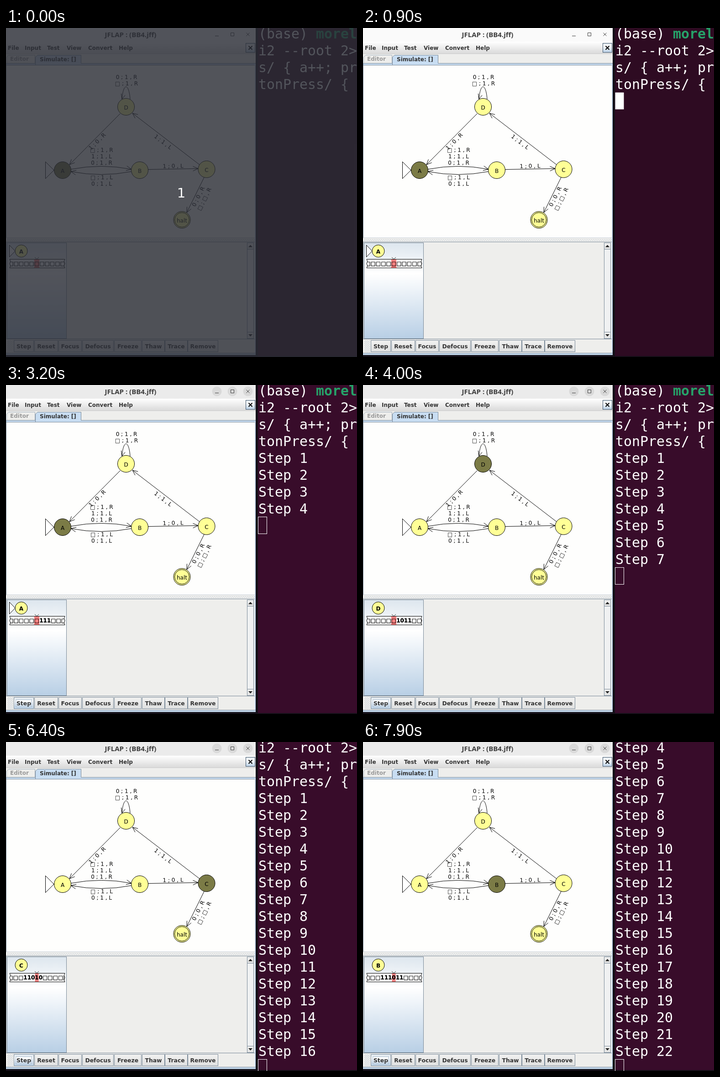
Recreate the animation shown at these times as an HTML page. Size 769x722 px, loop 8 s.

```html
<!DOCTYPE html>
<html lang="en">
<head>
<meta charset="utf-8">
<title>Turing machine stepper</title>
<style>
  html, body { margin: 0; width: 100%; height: 100%; overflow: hidden; background: #141018; }
  svg { display: block; }
  text { font: 12px "DejaVu Sans", sans-serif; fill: #000; white-space: pre; }
  .bold { font-weight: 700; fill: #333; }
  .mid { text-anchor: middle; }
  .title { font: 700 15px "Open Sans", sans-serif; fill: #3d3d3d; }
  .term { font: 29.9px "DejaVu Sans Mono", monospace; fill: #fff; }
  .tape { font-weight: 700; stroke: #000; stroke-width: .3; }
</style>
</head>
<body>
<svg id="stage" width="769" height="722" viewBox="0 0 769 722">
  <defs>
    <linearGradient id="ocean" x2="0" y2="1">
      <stop offset="0" stop-color="#dde6ee"/><stop offset=".32" stop-color="#fff"/><stop offset="1" stop-color="#b8cfe5"/>
    </linearGradient>
    <linearGradient id="menu" x2="0" y2="1"><stop offset="0" stop-color="#fff"/><stop offset="1" stop-color="#dadada"/></linearGradient>
    <linearGradient id="button" x2="0" y2="1"><stop offset="0" stop-color="#f2f2f1"/><stop offset="1" stop-color="#dfe0e0"/></linearGradient>
    <pattern id="bumps" width="4" height="4" patternUnits="userSpaceOnUse">
      <path d="M0 0h1v1h-1zM2 2h1v1h-1z" fill="#8a9aab"/><path d="M1 1h1v1h-1zM3 3h1v1h-1z" fill="#fff"/>
    </pattern>
    <clipPath id="tapeClip"><path d="M9 505H128V528H9z"/></clipPath>
  </defs>
</svg>
<script>
const stage = document.getElementById("stage");
const LOOP = 8000, ROW = 37, STATE = "#ffff96", ACTIVE = "#7b7b46", EDGE = "#7a8a99", BLUE = "#c8ddf2";

function add(tag, attrs, parent = stage) {
  const node = document.createElementNS("http://www.w3.org/2000/svg", tag);
  for (const key in attrs) node.setAttribute(key, attrs[key]);
  return parent.appendChild(node);
}
const box = (x, y, width, height, fill, stroke = "none", parent) =>
  add("rect", { x, y, width, height, fill, stroke }, parent);
const path = (d, attrs) => add("path", { d, fill: "none", stroke: "#000", ...attrs });
const circle = (cx, cy, r, fill, stroke = "#000", parent) => add("circle", { cx, cy, r, fill, stroke }, parent);
function label(text, x, y, cls = "", parent, attrs = {}) {
  const node = add("text", { x, y, class: cls, ...attrs }, parent);
  node.textContent = text;
  return node;
}
const show = (node, on) => node.setAttribute("visibility", on ? "visible" : "hidden");

// Terminal
const terminal = box(552, 0, 217, 720, "#2e0b22");
const screen = add("g", {});
const lines = ["(base) ", "i2 --root 2>", "s/ { a++; pr", "tonPress/ {"];
for (let i = 1; i <= 22; i++) lines.push("Step " + i);
const rows = lines.map((text, i) => label(text, 553, 23 + ROW * i, "term", screen));
label("morel", 679, 23, "term", screen, { style: "fill:#26a269;font-weight:700" });
const cursor = box(552.5, 0, 19, 37, "#fff", "none", screen);

// Window frame
box(0, 0, 547, 718, "#eeeeec");
const titleBar = box(0, 0, 547, 30, "#fafafa");
const titleButtons = add("g", {});
for (const x of [462, 496, 530]) circle(x, 14, 10.5, "#d9d9d9", "none", titleButtons);
path("M458 17.5H466M492.5 10.5h7v7h-7zM526.5 10.5l7 7M533.5 10.5l-7 7", { stroke: "#3d3d3d" });
label("JFLAP : (BB4.jff)", 273, 20, "title mid");

box(0, 30, 547, 26, "url(#menu)");
path("M0 56.5H547", { stroke: "#ccc" });
[["File", 4], ["Input", 41], ["Test", 90], ["View", 133], ["Convert", 180], ["Help", 247]]
  .forEach(([text, x]) => label(text, x, 48, "bold"));
box(525.5, 33.5, 20, 20, "url(#ocean)", "#41566b");
path("M531.5 39.5l8 8M539.5 39.5l-8 8", { "stroke-width": 2 });

// Tabs
path("M1.5 77V64L6 59.5H63.5V77", { stroke: "#a3b0bd" });
label("Editor", 9, 72, "bold", stage, { style: "fill:#999" });
box(0, 77, 547, 5, BLUE);
path("M0 77.5H547M0.5 77V461M0 81.5H545", { stroke: EDGE });
path("M64.5 81V64L69 59.5H164.5V77.5", { fill: BLUE, stroke: EDGE });
box(65, 77, 99, 4, BLUE);
label("Simulate: []", 74, 73, "bold");

// State diagram
box(1, 82, 544, 378, "#fefefd");
box(545, 78, 2, 636, BLUE);
path("M0 460.5H545", { stroke: "#c5cdd5" });
box(1, 463, 544, 5, "url(#bumps)");

function edge(x1, y1, cx, cy, x2, y2) {
  const angle = Math.atan2(y2 - cy, x2 - cx);
  const barb = s => `${x2 - 12.5 * Math.cos(angle + s)} ${y2 - 12.5 * Math.sin(angle + s)}`;
  path(`M${x1} ${y1}Q${cx} ${cy} ${x2} ${y2}M${barb(.42)}L${x2} ${y2}L${barb(-.42)}`);
}
const straight = (x1, y1, x2, y2) => edge(x1, y1, (x1 + x2) / 2, (y1 + y2) / 2, x2, y2);
edge(142, 310, 209, 297, 275, 310);
edge(275, 315, 209, 328, 142, 315);
straight(311, 310.5, 421, 308.5);
straight(424, 300, 277, 187);
straight(250, 188, 139, 300);
straight(434, 328, 396, 405);
path("M272 156C269 120 257 120 254 156M252.5 144L254 156L261 147.5");
path("M86.5 293.5V330.5L105 312Z", { fill: "#fff" });

const rule = (text, x, y, angle = 0) =>
  label(text, x, y + (angle ? 4 : 0), "mid", stage, angle ? { transform: `rotate(${angle} ${x} ${y})` } : {});
rule("0 ; 1 , R", 264, 112);
rule("□ ; 1 , R", 264, 126);
rule("□ ; 1 , R", 209.5, 272);
rule("1 ; 1 , L", 209.5, 286);
rule("0 ; 1 , R", 209.5, 300);
rule("□ ; 1 , L", 209.5, 332);
rule("0 ; 1 , L", 209.5, 346);
rule("1 ; 0 , L", 366, 303, -1);
rule("1 ; 1 , L", 344, 250, 37.5);
rule("1 ; 0 , R", 200, 249, -45);
rule("0 ; 0 , R", 421.5, 370, -63.4);
rule("□ ; □ , R", 434.5, 375.5, -63.4);

const nodes = {};
for (const [name, x, y] of [["A", 124, 312], ["B", 293, 312], ["C", 439.5, 310], ["D", 263, 173], ["halt", 385.5, 421]]) {
  nodes[name] = circle(x, y, 18.5, STATE);
  if (name === "halt") circle(x, y, 16, STATE);
  label(name, x, y + 6, "mid");
}

// Configuration list
box(0, 469, 545, 1, EDGE);
box(2.5, 471.5, 130, 210, "url(#ocean)", EDGE);
path("M0.5 470V683M0 682.5H545", { stroke: EDGE });
box(528.5, 471.5, 14, 210, "#f0f1f2", EDGE);
for (const y of [471.5, 667.5]) box(528.5, y, 14, 14, "url(#button)", EDGE);
path("M531 481h9l-4.5-5zM531 672h9l-4.5 5z", { fill: "#222", stroke: "none" });
const startMark = path("M7.5 476.5V502.5L20 489.5Z", { fill: "#fff" });
circle(33.5, 489.5, 13.5, STATE);
const stateName = label("", 33.5, 494.5, "bold mid", stage, { style: "fill:#000" });
path("M8 507.5H129L127 512L129 517L127 522L129 526.5H8L10 522L8 517L10 512Z", { fill: "#fff" });
const head = box(62, 508, 11, 18, "#ff8080");
path("M63 503L67.5 507.5L72 503", { "stroke-width": .8 });
const tape = add("g", { "clip-path": "url(#tapeClip)" });
const tapeText = anchor => label("", 67.5, 521, "tape", tape, { "text-anchor": anchor });
const [leftTape, headTape, rightTape] = ["end", "middle", "start"].map(tapeText);

// Buttons
box(3, 686, 12, 25, "url(#bumps)");
const buttons = {};
for (const [name, x, width] of [["Step", 18, 42], ["Reset", 63, 50], ["Focus", 116, 49], ["Defocus", 168, 67],
  ["Freeze", 238, 58], ["Thaw", 299, 48], ["Trace", 349, 48], ["Remove", 399, 65]]) {
  buttons[name] = box(x - .5, 685.5, width + 1, 25, "url(#button)", EDGE);
  label(name, x + width / 2, 703, "bold mid", stage, { style: "font-size:12.4px" });
}
const focusRing = box(21.5, 690.5, 35, 16, "none", "#a3b8cc");
box(0, 713, 547, 5, BLUE);
path("M0 713.5H547M0 717.5H547", { stroke: EDGE });

// Countdown
const overlay = add("g", {});
box(0, 0, 769, 722, "rgba(43,45,54,.81)", "none", overlay);
label("1", 384, 372, "mid", overlay, { style: "font-size:29px;fill:#fff" });

// Machine: state + symbol -> written symbol, move, next state
const rules = {
  "A□": ["1", 1, "B"], A0: ["1", 1, "B"], A1: ["1", -1, "B"],
  "B□": ["1", -1, "A"], B0: ["1", -1, "A"], B1: ["0", -1, "C"],
  C1: ["1", -1, "D"], C0: ["0", 1, "halt"], "C□": ["□", 1, "halt"],
  D1: ["0", 1, "A"], D0: ["1", 1, "D"], "D□": ["1", 1, "D"]
};
const history = [];
{
  const cells = Array(81).fill("□");
  let at = 40, state = "A";
  for (let n = 0; n <= 22; n++) {
    history.push({ state, symbol: cells[at], left: cells.slice(at - 8, at).join(""), right: cells.slice(at + 1, at + 9).join("") });
    const [write, move, next] = rules[state + cells[at]];
    cells[at] = write;
    at += move;
    state = next;
  }
}
// Times, in tenths of a second, at which a click prints and the machine follows
const printed = [22, 25, 28, 31, 34, 36, 39, 42, 44, 48, 51, 53, 56, 58, 61, 63, 66, 68, 70, 73, 75, 78];
const moved = [23, 26, 29, 32, 35, 38, 40, 43, 46, 49, 52, 55, 57, 59, 62, 64, 67, 69, 71, 74, 76, 79];
const quickClicks = [3, 10];

function render(ms) {
  const tick = Math.floor(ms / 100);
  const count = times => times.filter(t => t <= tick).length;
  const prints = count(printed), moves = count(moved), focused = tick >= 21;

  show(overlay, tick < 1);
  terminal.setAttribute("fill", focused ? "#380c2a" : "#2e0b22");
  titleBar.setAttribute("fill", focused ? "#ebebeb" : "#fafafa");
  show(titleButtons, focused);

  rows.forEach((row, i) => show(row, i < 4 + prints));
  screen.setAttribute("transform", `translate(0 ${-ROW * Math.max(0, prints - 15)})`);
  cursor.setAttribute("y", -6.5 + ROW * (4 + prints));
  cursor.setAttribute("fill", focused ? "none" : "#fff");
  cursor.setAttribute("stroke", focused ? "#fff" : "none");
  show(cursor, focused || (tick >= 1 && tick < 3) || (tick >= 9 && tick < 15));

  const { state, symbol, left, right } = history[moves];
  for (const name in nodes) nodes[name].setAttribute("fill", name === state ? ACTIVE : STATE);
  stateName.textContent = state;
  show(startMark, state === "A");
  const half = symbol === "□" ? 5.65 : 4.17;
  head.setAttribute("x", 67.5 - half);
  head.setAttribute("width", 2 * half);
  headTape.textContent = symbol;
  leftTape.textContent = left;
  leftTape.setAttribute("x", 67.5 - half);
  rightTape.textContent = right;
  rightTape.setAttribute("x", 67.5 + half);

  const pressed = tick === 21 || (prints > moves && !quickClicks.includes(prints));
  const hover = tick >= 19 ? "Step" : tick >= 16 ? "Reset" : "";
  for (const name of ["Step", "Reset"]) {
    const down = name === "Step" && pressed;
    buttons[name].setAttribute("fill", down ? "#b8cfe5" : name === hover ? "url(#ocean)" : "url(#button)");
  }
  show(focusRing, focused);
}

const start = performance.now();
function frame() {
  render((performance.now() - start) % LOOP);
  requestAnimationFrame(frame);
}
frame();
</script>
</body>
</html>
```
